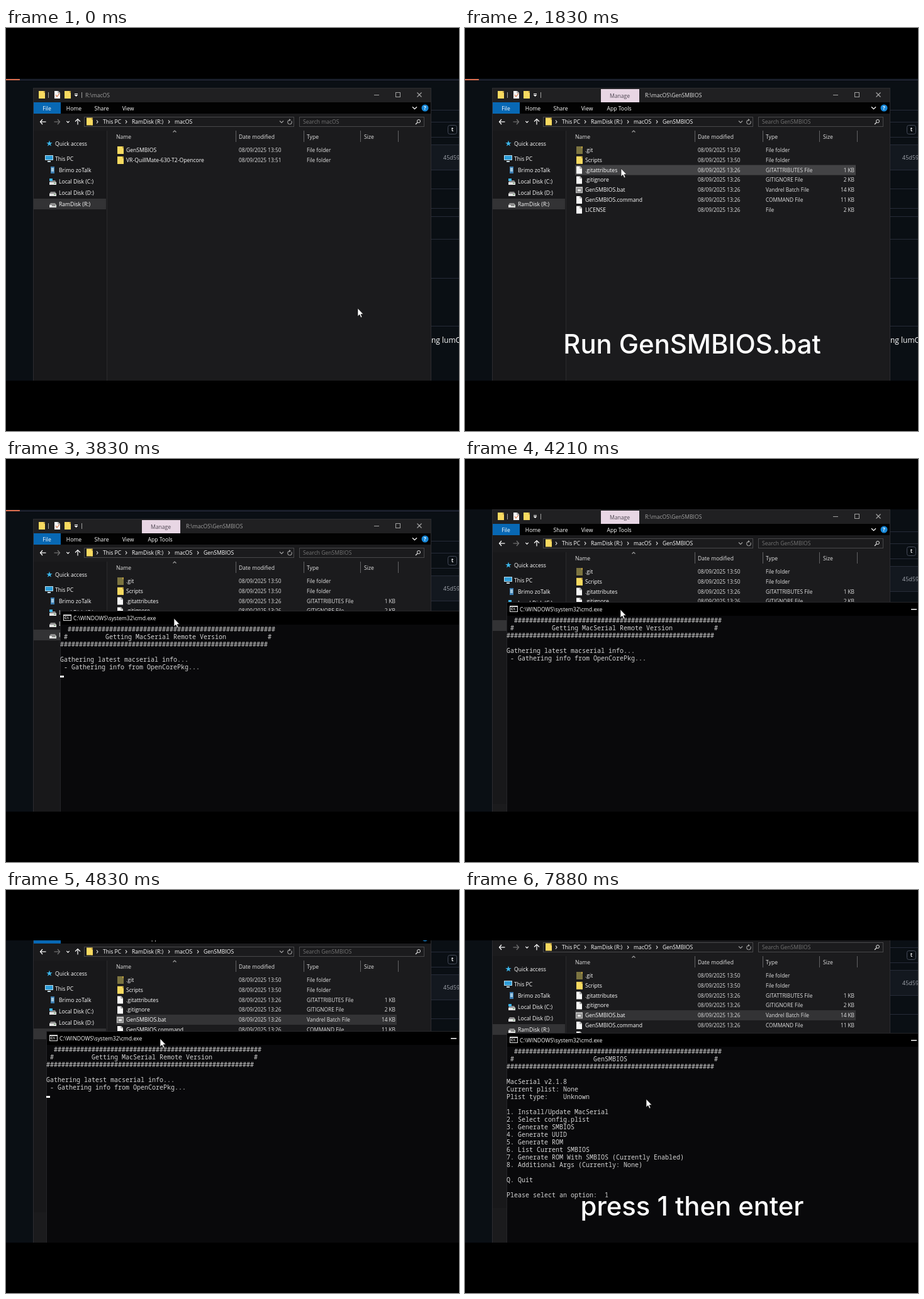
These frames come from a looping animation (720x640 px, 8 s). An HTML page with a canvas:

```html
<!DOCTYPE html>
<html lang="en">
<head>
<meta charset="utf-8">
<title>Running a script</title>
<style>
html, body { margin: 0; width: 100%; height: 100%; overflow: hidden; background: #000; }
canvas { display: block; width: 720px; height: 640px; }
</style>
</head>
<body>
<canvas id="stage" width="720" height="640"></canvas>
<script>
const c = document.getElementById('stage').getContext('2d');
const LOOP = 8000;
const UI = '"Open Sans", "Noto Sans", sans-serif';
const MONO = '"Noto Sans Mono", "DejaVu Sans Mono", monospace';
const WHITE = '#ffffff', SOFT = '#e2e2e2', GREY = '#a0a0a0', DIM = '#747474';
const PAGE = '#0a0f14', PANEL = '#1b1b1d', EDGE = '#48484a', RULE = '#262b38';
const PICKED = '#777777', HOVER = '#434345', IDLE = '#333335', YELLOW = '#f8da60';

// Times of the hard changes
const T = { caption1: 450, select: 760, open: 1120, pick: 2250, cmd: 2400, grab: 2930,
  header: 3130, caption1End: 3150, info: 3400, drop: 5050, menu: 6050,
  caption2: 6640, typed: 7790 };

// Mouse tip: time, x, y
const MOUSE = [
  [0, 559, 445], [40, 559, 445], [730, 239, 189], [1540, 239, 189],
  [2100, 256, 254], [2400, 256, 254], [2670, 304, 201], [2870, 319, 129],
  [2950, 319, 129], [3830, 267, 253], [4500, 239, 229], [5000, 247, 239],
  [5100, 247, 239], [5700, 278, 326], [6250, 286, 331],
  [7750, 286, 331], [7880, 288, 332], [LOOP, 288, 332]
];

// Smooth curve through the keys that never overshoots them
function follow(keys, t, k) {
  let i = 0;
  while (i < keys.length - 2 && t >= keys[i + 1][0]) i++;
  const slope = j => j < 0 || j > keys.length - 2 ? 0 :
    (keys[j + 1][k] - keys[j][k]) / (keys[j + 1][0] - keys[j][0]);
  const tangent = j => {
    const a = slope(j - 1), b = slope(j);
    return a * b > 0 ? 2 * a * b / (a + b) : 0;
  };
  const span = keys[i + 1][0] - keys[i][0], u = (t - keys[i][0]) / span, v = 1 - u;
  return v * v * (1 + 2 * u) * keys[i][k] + u * u * (1 + 2 * v) * keys[i + 1][k] +
    span * u * v * (v * tangent(i) - u * tangent(i + 1));
}

function easeOut(t, a, b) {
  const u = Math.min(1, Math.max(0, (t - a) / (b - a)));
  return u * (2 - u);
}

function box(x, y, w, h, fill) {
  c.fillStyle = fill;
  c.fillRect(x, y, w, h);
}

function frame(x, y, w, h, col) {
  c.strokeStyle = col;
  c.lineWidth = 1;
  c.strokeRect(x + .5, y + .5, w - 1, h - 1);
}

function poly(pts, col, fill) {
  c.beginPath();
  pts.forEach(([x, y], i) => i ? c.lineTo(x, y) : c.moveTo(x, y));
  if (fill) {
    c.closePath();
    c.fillStyle = col;
    c.fill();
  } else {
    c.strokeStyle = col;
    c.lineWidth = 1.2;
    c.stroke();
  }
}

// y is the middle of the line
function text(s, x, y, col = WHITE, size = 8.6, align = 'left', weight = 500) {
  c.font = `${weight} ${size}px ${UI}`;
  c.textAlign = align;
  c.textBaseline = 'alphabetic';
  c.fillStyle = col;
  c.fillText(s, x, y + size * .36);
}

function folder(x, y, col = YELLOW) {
  box(x, y - 6, 9, 12, col);
  box(x + 8, y - 3, 2, 9, col);
  box(x + 8, y - 6, 2, 3, '#b89a40');
}

function sheet(x, y) {
  poly([[x, y - 6], [x + 6, y - 6], [x + 9, y - 3], [x + 9, y + 6], [x, y + 6]], '#f6f6f6', true);
  poly([[x + 6, y - 6], [x + 6, y - 3], [x + 9, y - 3]], '#8c8c8c');
}

function script(x, y) {
  box(x - 1, y - 5, 11, 10, '#c8c8c8');
  box(x, y - 3, 9, 7, '#8c8c8c');
  box(x + 2, y - 1, 5, 3, '#e8e8e8');
}

function arrow(x, y, dir, col) {
  poly([[x - 4.5, y], [x + 4.5, y]], col);
  poly([[x + dir, y - 4], [x + dir * 4.5, y], [x + dir, y + 4]], col);
}

function chevron(x, y, col, r = 3) {
  poly([[x - r, y - r / 2], [x, y + r / 2], [x + r, y - r / 2]], col);
}

function page() {
  box(0, 0, 720, 700, PAGE);
  box(0, 82, 720, 1, '#30344a');
  box(0, 81, 22, 2, '#e07050');
  for (const y of [130, 149, 173, 255, 286, 299, 335, 397, 473]) box(675, y, 45, 1, RULE);
  box(675, 185, 45, 41, '#13181f');
  box(675, 185, 45, 1, RULE);
  box(675, 225, 45, 1, RULE);
  text('45d59', 695, 205.5, '#a0a4ac', 9);
  c.beginPath();
  c.roundRect(702.5, 154.5, 14, 14, 3);
  c.strokeStyle = '#444a58';
  c.lineWidth = 1;
  c.stroke();
  text('t', 709.5, 161, WHITE, 9, 'center', 600);
  text('ng lumOra', 676, 496, WHITE, 12, 'left', 400);
}

function drive(x, y, tint) {
  poly([[x + 2, y - 1], [x + 9, y - 1], [x + 11, y + 2], [x, y + 2]], '#8c8c8c', true);
  box(x, y + 2, 11, 4, '#e4e4e4');
  box(x + 7, y + 3, 3, 1, '#508c50');
  if (tint) box(x, y - 4, 5, 4, tint);
}

function sidebar() {
  box(44, 163, 116, 400, '#18181a');
  box(160, 163, 1, 400, '#2a2a2c');
  box(44, 271, 115, 17, IDLE);
  const star = [];
  for (let i = 0; i < 10; i++) {
    const r = i % 2 ? 2 : 5, a = i * Math.PI / 5 - Math.PI / 2;
    star.push([69 + r * Math.cos(a), 183.5 + r * Math.sin(a)]);
  }
  poly(star, '#3cb4e8', true);
  text('Quick access', 78, 183.5);
  box(62, 202, 13, 8, '#b8dcec');
  box(63, 203, 11, 6, '#2c9cd8');
  box(66, 211, 5, 2, '#c8dce4');
  text('This PC', 78, 207.5);
  box(71, 220, 6, 11, '#3c7cb0');
  box(72, 222, 4, 6, '#a0c8e0');
  text('Brimo zoTalk', 84, 225.5);
  drive(69, 243, '#3cb4e8');
  text('Local Disk (C:)', 84, 243.5);
  drive(69, 261);
  text('Local Disk (D:)', 84, 261.5);
  drive(69, 279);
  box(73, 280, 5, 3, '#8c8c8c');
  text('RamDisk (R:)', 84, 279.5);
}

function row(y, icon, name, date, type, size) {
  icon(177, y);
  text(name, 191, y);
  text('08/09/2025 ' + date, 370, y, SOFT, 8.3);
  text(type, 478, y, SOFT, 8.3);
  if (size) text(size, 619, y, SOFT, 8.3, 'right');
}

function mark(y, col) {
  box(175, y - 8, 446, 16, col);
}

function files(t, [x, y]) {
  if (t < T.open) {
    const hover = x > 175 && x < 621 && y > 185 && y < 218;
    if (hover) mark(y < 202 ? 194 : 210, HOVER);
    if (t >= T.select) mark(194, PICKED);
    row(194, folder, 'GenSMBIOS', '13:50', 'File folder');
    row(210, folder, 'VR-QuillMate-630-T2-Opencore', '13:51', 'File folder');
    return;
  }
  if (t >= T.cmd) mark(257, IDLE);
  else if (t >= T.pick) mark(257, PICKED);
  else if (y > 185 && y < 313) mark(194 + 15.8 * Math.floor((y - 185) / 16), HOVER);
  const list = [
    [(x, y) => folder(x, y, '#7c7440'), '.git', '13:50', 'File folder'],
    [folder, 'Scripts', '13:50', 'File folder'],
    [sheet, '.gitattributes', '13:26', 'GITATTRIBUTES File', '1 KB'],
    [sheet, '.gitignore', '13:26', 'GITIGNORE File', '2 KB'],
    [script, 'GenSMBIOS.bat', '13:26', 'Vandrel Batch File', '14 KB'],
    [sheet, 'GenSMBIOS.command', '13:26', 'COMMAND File', '11 KB'],
    [sheet, 'LICENSE', '13:26', 'File', '2 KB']
  ];
  list.forEach((f, i) => row(194 + i * 15.8, ...f));
}

function explorer(t, mouse) {
  const inside = t >= T.open, active = t < T.cmd;
  box(44, 95, 631, 560, PANEL);
  box(44, 95, 631, 23, '#202022');
  folder(52, 106);
  box(67, 102, 1, 9, GREY);
  sheet(77, 106);
  poly([[79, 106], [81, 109], [85, 104]], '#d87848');
  folder(93, 106);
  box(109, 104, 5, 1, WHITE);
  poly([[108.5, 106], [114.5, 106], [111.5, 109]], WHITE, true);
  box(120, 102, 1, 9, GREY);
  if (inside) {
    box(216, 97, 61, 21, '#e8d6e4');
    text('Manage', 246, 108, '#4c4450', 8.6, 'center');
    text('R:\\macOS\\GenSMBIOS', 286, 106.5, active ? SOFT : GREY);
  } else text('R:\\macOS', 126, 106.5, GREY);
  box(585, 106, 8, 1, GREY);
  frame(619, 102, 8, 8, GREY);
  poly([[653.5, 102.5], [660.5, 109.5]], GREY);
  poly([[660.5, 102.5], [653.5, 109.5]], GREY);

  box(44, 118, 631, 18, '#020202');
  box(44, 118, 43, 18, '#0868b4');
  const tabs = [['File', 65], ['Home', 108], ['Share', 152], ['View', 194]];
  if (inside) tabs.push(['App Tools', 245]);
  for (const [s, x] of tabs) text(s, x, 127.5, WHITE, 8.6, 'center');
  chevron(649.5, 127, WHITE, 3.5);
  c.beginPath();
  c.arc(666, 127, 5.5, 0, 7);
  c.fillStyle = '#1888d8';
  c.fill();
  text('?', 666, 127, WHITE, 8, 'center', 700);

  arrow(59, 149, -1, WHITE);
  arrow(81, 149, 1, DIM);
  chevron(98.5, 149, WHITE, 2.2);
  poly([[114, 153.5], [114, 145]], WHITE);
  poly([[110, 148.5], [114, 144.5], [118, 148.5]], WHITE);
  frame(124, 141, 334, 16, EDGE);
  folder(128, 148.5);
  const crumbs = [['This PC', 154], ['RamDisk (R:)', 200], ['macOS', 268]];
  if (inside) crumbs.push(['GenSMBIOS', 314]);
  for (const [s, x] of crumbs) {
    poly([[x - 10, 146.5], [x - 8, 149], [x - 10, 151.5]], SOFT);
    text(s, x, 149);
  }
  chevron(438, 149, GREY);
  c.beginPath();
  c.arc(451, 149.5, 3.3, -.6, 4.6);
  c.strokeStyle = GREY;
  c.lineWidth = 1.1;
  c.stroke();
  poly([[450, 144], [453, 146], [450, 148]], GREY, true);
  frame(466, 141, 199, 16, EDGE);
  text(inside ? 'Search GenSMBIOS' : 'Search macOS', 472, 149, DIM);
  c.beginPath();
  c.arc(656, 148, 2.5, 0, 7);
  c.strokeStyle = SOFT;
  c.stroke();
  poly([[654, 150], [651, 153]], SOFT);

  sidebar();
  poly([[265.5, 165.5], [268, 163], [270.5, 165.5]], GREY);
  for (const x of [365, 473, 563, 623]) box(x, 163, 1, 18, '#626264');
  const heads = [['Name', 175], ['Date modified', 370], ['Type', 478], ['Size', 569]];
  for (const [s, x] of heads) text(s, x, 172.5, SOFT);
  files(t, mouse);
  frame(43, 95, 633, 600, '#2c2c30');
}

function cmdLines(t) {
  const bar = '#'.repeat(55);
  const head = (s, col) => ['  ' + bar, (' #' + ' '.repeat(col - 2) + s).padEnd(55) + '#', bar, ''];
  if (t < T.header) return [];
  if (t < T.menu) {
    const out = head('Getting MacSerial Remote Version', 12);
    out.push('Gathering latest macserial info...');
    if (t >= T.info) out.push(' - Gathering info from OpenCorePkg...');
    return out;
  }
  return head('GenSMBIOS', 23).concat([
    'MacSerial v2.1.8', 'Current plist: None', 'Plist type:    Unknown', '',
    '1. Install/Update MacSerial', '2. Select config.plist', '3. Generate SMBIOS',
    '4. Generate UUID', '5. Generate ROM', '6. List Current SMBIOS',
    '7. Generate ROM With SMBIOS (Currently Enabled)',
    '8. Additional Args (Currently: None)', '', 'Q. Quit', '',
    'Please select an option:  ' + (t >= T.typed ? '1' : '')
  ]);
}

function cmd(t, x, y) {
  box(x, y, 760, 382, '#09090b');
  box(x, y, 760, 22, '#000');
  frame(x, y, 760, 382, '#252528');
  box(x + 5, y + 6, 13, 10, '#d8d8d8');
  box(x + 6, y + 8, 11, 7, '#101010');
  text('C:\\', x + 7, y + 11.5, WHITE, 5, 'left', 700);
  text('C:\\WINDOWS\\system32\\cmd.exe', x + 21, y + 11.5);
  box(x + 643, y + 11, 9, 1.5, WHITE);

  const lines = cmdLines(t);
  c.font = `500 10px ${MONO}`;
  c.textAlign = 'left';
  c.fillStyle = '#d6d6d6';
  lines.forEach((s, i) => c.fillText(s, x, y + 32.5 + i * 12));
  const menu = t >= T.menu;
  const lit = menu ? t >= 6930 && t < 7460 : t >= T.header && (t + 710) % 1060 < 530;
  if (lit) {
    const col = menu ? lines[lines.length - 1].length : 0;
    const line = menu ? lines.length - 1 : lines.length;
    box(x + col * 6, y + 31 + line * 12, 6, 3, WHITE);
  }
}

function caption(s) {
  c.font = '500 41.8px Inter, "Open Sans", sans-serif';
  c.textAlign = 'center';
  c.fillStyle = WHITE;
  c.fillText(s, 361, 516.5);
}

function pointer(x, y) {
  const shape = [[0, 0], [0, 13], [3, 10.3], [5, 15], [7, 14], [5.1, 9.6], [9, 9.6]];
  poly(shape.map(([a, b]) => [x + a, y + b]), WHITE, true);
  c.strokeStyle = '#101010';
  c.lineWidth = .7;
  c.stroke();
}

function draw(t) {
  const pan = Math.round(58 * easeOut(t, 4040, 5240));
  const mouse = [1, 2].map(k => Math.round(follow(MOUSE, t, k)));
  box(0, 0, 720, 640, '#000');
  c.save();
  c.beginPath();
  c.rect(0, 80, 720, 480);
  c.clip();
  c.save();
  c.translate(0, -pan);
  page();
  explorer(t, mouse);
  c.restore();
  if (t >= T.cmd) {
    const at = t < T.grab ? [138, 117] : t < T.drop ? [mouse[0] - 181, mouse[1] - 12] : [66, 227];
    cmd(t, ...at);
  }
  if (t >= T.caption1 && t < T.caption1End) caption('Run GenSMBIOS.bat');
  if (t >= T.caption2) caption('press 1 then enter');
  pointer(...mouse);
  c.restore();
}

const start = performance.now();
function tick() {
  draw((performance.now() - start) % LOOP);
  requestAnimationFrame(tick);
}
tick();
</script>
</body>
</html>
```
